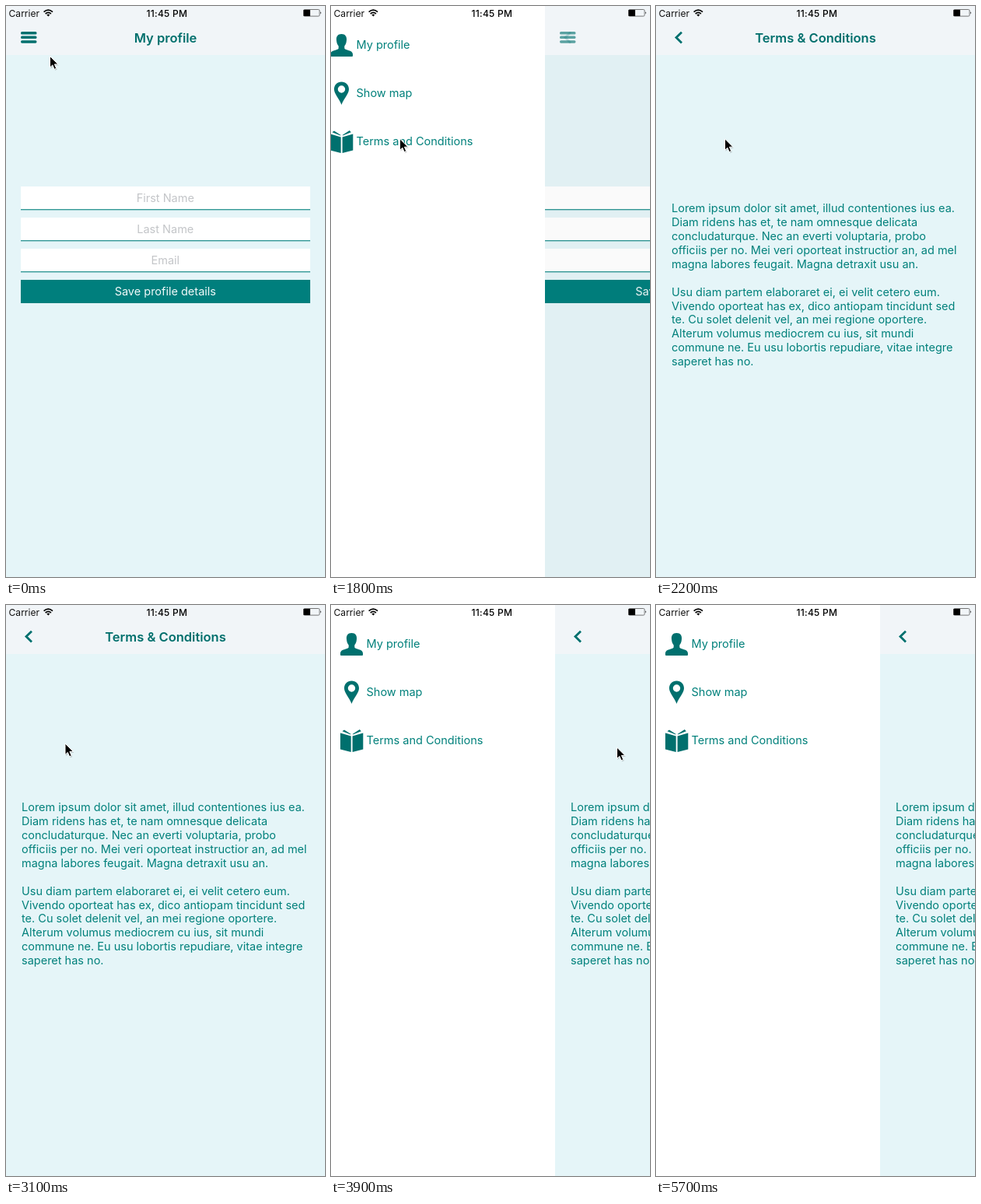
Write an HTML page that moves like this. It is 410x734 px and loops after 5800 ms.

```html
<!DOCTYPE html>
<html lang="en">
<head>
<meta charset="utf-8">
<title>Side menu demo</title>
<style>
  html, body { margin: 0; height: 100%; overflow: hidden; background: #fff; }
  svg { display: block; width: 100vw; height: 100vh; }
  text { font: 14.5px Inter, Roboto, sans-serif; white-space: pre; }
  .bg { fill: #e5f5f8; }
  .bar { fill: #f1f5f8; }
  .field { fill: #fff; }
  .teal { fill: #007f7d; }
  .icon { fill: #00706e; }
  .copy { fill: #00807b; }
  .hint { fill: #c3c5c8; text-anchor: middle; }
  .save { fill: #f2fafa; text-anchor: middle; }
  .title { font-size: 16.5px; font-weight: 600; fill: #006f6c; text-anchor: middle; }
  .status text { font-size: 12.1px; fill: #111; }
  .status .clock { font-size: 12px; font-weight: 500; letter-spacing: .3px; text-anchor: middle; fill: #000; }
  .line { fill: none; stroke: #00706e; stroke-width: 2.8; }
</style>
</head>
<body>
<svg viewBox="0 0 410 734" preserveAspectRatio="none">
  <g id="app">
    <g id="profile">
      <rect class="bg" width="410" height="734"/>
      <g id="fields"></g>
      <rect class="teal" x="19" y="352" width="372" height="30"/>
      <text class="save" x="204.8" y="372.2">Save profile details</text>
      <rect id="dim" width="410" height="734" opacity="0"/>
    </g>
    <g id="terms">
      <rect class="bg" width="410" height="734"/>
      <g id="copy" class="copy"></g>
    </g>
    <rect class="bar" width="410" height="63"/>
    <g id="burger" class="icon"></g>
    <path id="back" class="line" d="M33 33.8 26 40.6 33 47.4"/>
    <text id="profileTitle" class="title" x="205" y="47">My profile</text>
    <text id="termsTitle" class="title" x="205" y="47">Terms &amp; Conditions</text>
  </g>

  <g id="menu">
    <rect width="288" height="734" fill="#fff"/>
    <g class="icon">
      <path d="M26.5 36C31.5 36 33.5 39.5 33 44C32.7 48 31.5 50 30.3 51.5V54.500C31 57 41 56.500 41 62V64Q41 65 40 65H13Q12 65 12 64V62C12 56.500 22 57 22.700 54.500V51.500C21.500 50 20.300 48 20 44C19.500 39.500 21.500 36 26.500 36Z"/>
      <path fill-rule="evenodd" d="M26.500 97.500C32 97.500 36 101.500 36 107C36 113 29.500 119 26.500 127C23.500 119 17 113 17 107C17 101.500 21 97.500 26.500 97.500ZM26.500 102.300A4.700 4.700 0 1 0 26.500 111.700A4.700 4.700 0 1 0 26.500 102.300Z"/>
      <path d="M12 164.500 25.700 168.500V189L12 185.500ZM41.300 164.500 27.600 168.500V189L41.300 185.500ZM14.500 162.300 17 160.500 25.700 166 25 166.600ZM38.800 162.300 36.800 160 27.600 166 28.300 166.600Z"/>
    </g>
    <g id="items" class="copy"></g>
  </g>

  <g class="status">
    <text x="3.5" y="14">Carrier</text>
    <path d="M48.6 7.7Q54.3 2.6 60 7.7M50.7 10Q54.3 6.8 57.9 10" fill="none" stroke="#000" stroke-width="1.7"/>
    <path d="M52.3 11.3Q54.3 9.7 56.3 11.3L54.3 13.5Z"/>
    <text class="clock" x="206.9" y="14">11:45 PM</text>
    <rect x="382.5" y="4.5" width="20.5" height="8.6" rx="1.5" fill="none" stroke="#555" stroke-width=".8"/>
    <rect x="382.5" y="5" width="8.5" height="8"/>
    <path d="M404.2 7.3Q406 8.800 404.2 10.300Z"/>
  </g>

  <g id="cursor">
    <path d="M1 1.5V16L4.3 13 6.7 18.3 9.3 17.2 7 12H11.3Z" opacity=".18"/>
    <path d="M0 0V14.5L3.3 11.4 5.6 16.8 8.2 15.7 5.9 10.4H10.4Z" stroke="#fff"/>
  </g>
</svg>

<script>
const $ = id => document.getElementById(id);
const LOOP = 5800, STEP = 100, MENU = 288, WIDTH = 410;

const fill = (id, list, part) => { $(id).innerHTML = list.map(part).join(''); };

fill('fields', ['First Name', 'Last Name', 'Email'], (hint, i) => {
  const y = 232 + i * 40;
  return `<rect class="field" x="19" y="${y}" width="372" height="30"/>
    <rect class="teal" x="19" y="${y + 29.2}" width="372" height="1.1"/>
    <text class="hint" x="204.8" y="${y + 20.2}">${hint}</text>`;
});

fill('burger', [0, 1, 2], i =>
  `<rect x="19" y="${33 + i * 5.6}" width="20.5" height="3.5" rx="1.6"/>`);

fill('items', ['My profile', 'Show map', 'Terms and Conditions'], (name, i) =>
  `<text x="45.5" y="${55.2 + i * 62}">${name}</text>`);

const copy = `Lorem ipsum dolor sit amet, illud contentiones ius ea.
Diam ridens has et, te nam omnesque delicata
concludaturque. Nec an everti voluptaria, probo
officiis per no. Mei veri oporteat instructior an, ad mel
magna labores feugait. Magna detraxit usu an.

Usu diam partem elaboraret ei, ei velit cetero eum.
Vivendo oporteat has ex, dico antiopam tincidunt sed
te. Cu solet delenit vel, an mei regione oportere.
Alterum volumus mediocrem cu ius, sit mundi
commune ne. Eu usu lobortis repudiare, vitae integre
saperet has no.`;
fill('copy', copy.split('\n'), (line, i) =>
  `<text x="20" y="${265.2 + i * 17.9}">${line}</text>`);

// Progress from 0 to 1, plain and eased.
const ramp = (t, start, length) => Math.max(0, Math.min(1, (t - start) / length));
const smooth = (t, start, length) => {
  const u = ramp(t, start, length);
  return u * u * (3 - 2 * u);
};

const DRAG = { start: 3200, length: 680 };

// Each glide eases the pointer on to its next resting place.
const glides = [
  { start: 0, length: 400, x: 31, y: 47 },
  { start: 1000, length: 500, x: 88.5, y: 170.8 },
  { start: 2700, length: 400, x: 76, y: 178 },
  { ...DRAG, x: 367.5, y: 183 },
  { start: 4300, length: 400, x: 368, y: -22 }
];

function pointer(t) {
  let x = 56.5, y = 64.5;
  for (const g of glides) {
    const u = smooth(t, g.start, g.length);
    x += (g.x - x) * u;
    y += (g.y - y) * u;
  }
  return [x, y];
}

const drawer = t => Math.round(MENU *
  (smooth(t, 500, 310) - smooth(t, 1760, 310) + smooth(t, DRAG.start, DRAG.length)));

const push = t => 1 - (1 - ramp(t, 1760, 400)) ** 2;

const move = (id, x, y = 0) => $(id).setAttribute('transform', `translate(${x} ${y})`);
const fade = (id, v) => $(id).setAttribute('opacity', Math.max(0, v));

function draw(t) {
  const open = drawer(t), p = push(t);
  move('app', open);
  move('menu', open - MENU);
  move('profile', -.3 * WIDTH * p);
  move('terms', WIDTH * (1 - p));
  fade('dim', .11 * p);
  fade('burger', 1 - 2 * p);
  fade('back', p);
  move('profileTitle', -150 * p);
  fade('profileTitle', 1 - 1.5 * p);
  move('termsTitle', WIDTH / 2 * (1 - p));
  fade('termsTitle', p);
  move('cursor', ...pointer(t));
}

const start = performance.now();
function tick() {
  const t = (performance.now() - start) % LOOP;
  draw(Math.floor(t / STEP) * STEP);
  requestAnimationFrame(tick);
}
tick();
</script>
</body>
</html>
```
